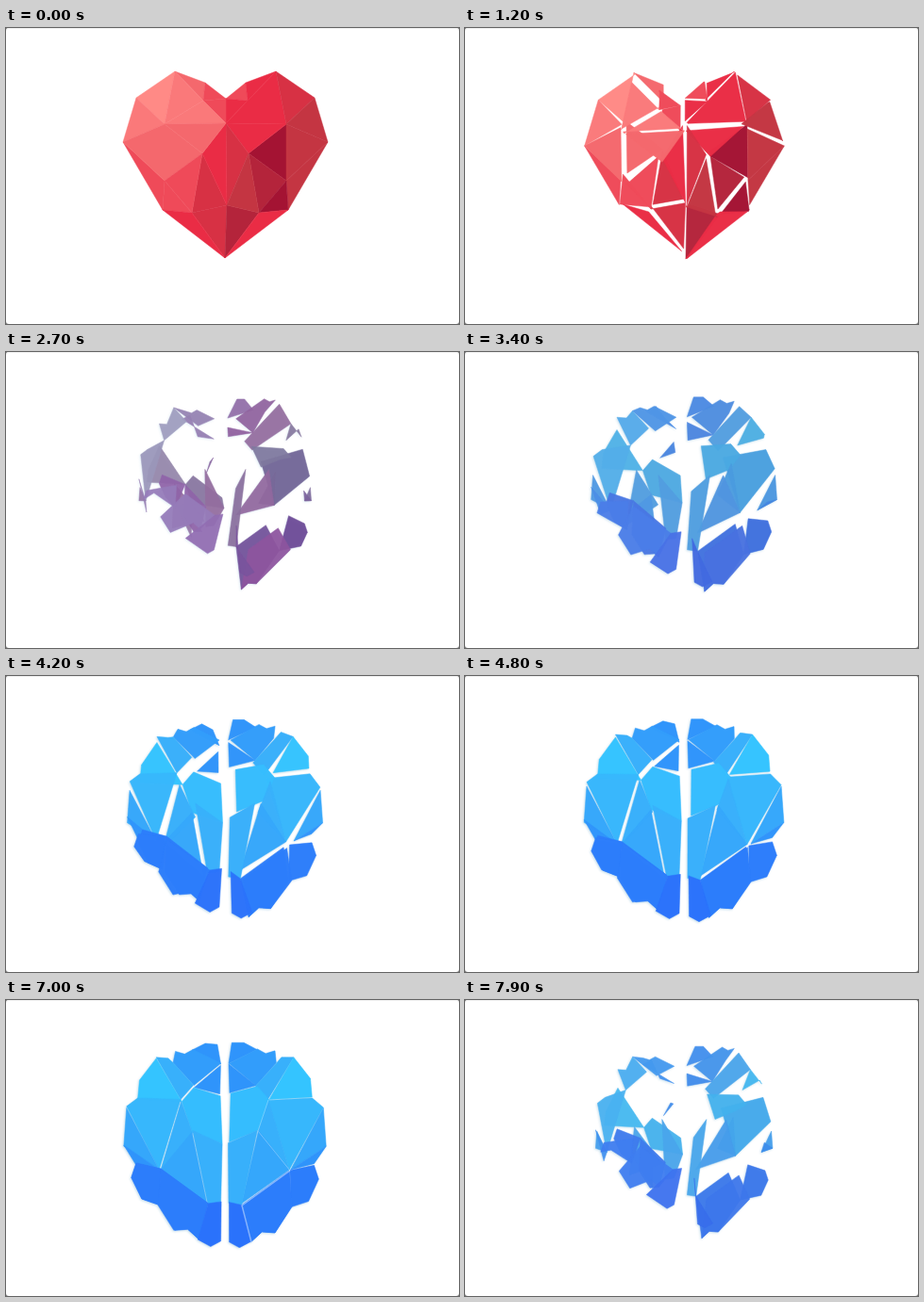
Recreate the animation shown at these times as an HTML page. Size 480x314 px, loop 8000 ms.

```html
<!DOCTYPE html>
<html lang="en">
<head>
<meta charset="utf-8">
<title>Heart and brain</title>
<style>
  html, body { margin: 0; width: 100%; height: 100%; overflow: hidden; background: #777; }
  svg { display: block; width: 480px; height: 314px; background: #fff; border-radius: 3px; box-shadow: inset 0 1px #eee; }
  polygon { stroke-width: .5; stroke-linejoin: round; }
  polyline { fill: none; stroke: #e8f6ff; stroke-linejoin: round; }
</style>
</head>
<body>
<svg viewBox="0 0 480 314">
  <g id="pieces"></g>
  <g id="cracks"></g>
</svg>
<script>
const LOOP = 8000, MORPH = 5500, OUT = 850, BACK = 6870;
const HEART_AXIS = 232.5, BRAIN_AXIS = 232;

const clamp = v => Math.min(1, Math.max(0, v));
const mix = (a, b, k) => a.map((v, i) => v + (b[i] - v) * k);
const smooth = v => { v = clamp(v); return v * v * (3 - 2 * v); };
const mirror = ([x, y], axis) => [2 * axis - x, y];

// Right half of each shape, one letter per corner; the left half is its mirror image.
const mesh = (names, text) => {
  const xy = text.split(' ').map(s => s.split(',').map(Number));
  return Object.fromEntries([...names].map((n, i) => [n, xy[i]]));
};
const heart = mesh('CDEFGHINOQRSUX',
  '233,75 254,58 286,46 327,74 341,121 299,193 232,244 233,101 297,102 257,133 297,162 234,188 268,196 256,77');
const brain = mesh('ABCDEFGHIJKLMNOPQRSTUVWXYZ3456',
  '239,45 252,45 266,52 236,67 285,54 287,67 265,91 237,99 292,61 305,60 323,83 278,106 325,104 ' +
  '337,113 340,155 301,181 267,139 235,152 250,218 236,216 327,175 332,190 321,214 303,220 286,247 272,246 ' +
  '260,257 247,264 236,258 275,57');

// Each brain facet and its shade, then the heart corners that fly to it, with a shade.
// Lower-case heart corners lie on the left half.
const facets = `
ABCD 3 DDXC3 rooq2
DC6EFG 4 XEEEDX4 xxxxed2
DGH 3 NXC4 uSq5
GFIJL 6 NXEON4 eeoof0
JKML 9 OOEF5 rhhu3
LMNP 7 QORQ8 foog1
NOP 5 HRG6 hrg3
HGLQR 8 OGGFF6 IuuuS5
LPQ 6 RQU7 huI4
QPS 5 OQN4 uqr3
RQST 6 QNSS5 SNqq4
POU 3 GRO6 gor2
PUVWX 1 RHHHU8 Cdddx3 xooex1
PXYZ3S 1 SUIIIS7 UHIIIU4 CNNNxx3 NooxxN1
TS345 0 QSUUU6 NNoqq2`;

const rgb = c => [1, 3, 5].map(i => parseInt(c.substr(i, 2), 16));
const ramp = colors => {
  const stops = colors.split(' ').map(rgb);
  return v => {
    const at = v * (stops.length - 1), i = Math.min(stops.length - 2, Math.floor(at));
    return mix(stops[i], stops[i + 1], at - i);
  };
};
const red = ramp('#ff8a86 #f4686d #ea2c45 #c43542 #a41333');
const blue = ramp('#2a72fb #2f94fb #38b0fb #34c4ff');

const add = (parent, tag) => {
  const el = document.createElementNS('http://www.w3.org/2000/svg', tag);
  parent.append(el);
  return el;
};
const group = document.getElementById('pieces');
const cracks = document.getElementById('cracks');

const heartPoint = n => heart[n] || mirror(heart[n.toUpperCase()], HEART_AXIS);
const pieces = facets.trim().split('\n').flatMap(row => {
  const [outline, shade, ...sources] = row.split(' ');
  return sources.map(source => {
    const left = /[a-z]/.test(source);
    return {
      el: add(group, 'polygon'),
      from: [...source.slice(0, -1)].map(heartPoint),
      to: [...outline].map(n => left ? mirror(brain[n], BRAIN_AXIS) : brain[n]),
      warm: red(source.slice(-1) / 8),
      cold: blue(shade / 9)
    };
  });
});

for (const [path, width] of [['LQP', .7], ['PS3', 1.5]]) {
  const line = add(cracks, 'polyline');
  line.setAttribute('points', [...path].map(n => brain[n]).join(' '));
  line.setAttribute('stroke-width', width);
}

// Solves cubic-bezier(.2, .12, .25, 1) for the progress at time x.
function ease(x) {
  if (x <= 0 || x >= 1) return clamp(x);
  const bez = (a, b, s) => 3 * a * s * (1 - s) ** 2 + 3 * b * s * s * (1 - s) + s ** 3;
  let lo = 0, hi = 1;
  for (let i = 0; i < 24; i++) {
    const mid = (lo + hi) / 2;
    if (bez(.2, .25, mid) < x) lo = mid; else hi = mid;
  }
  return bez(.12, 1, lo);
}

function draw(t) {
  const back = t >= BACK;
  const x = clamp((t - (back ? BACK : OUT)) / MORPH);
  const flip = v => back ? 1 - v : v;
  const pose = flip(ease(x));
  const tint = flip(smooth((x - .1) / .48));
  for (const { el, from, to, warm, cold } of pieces) {
    const color = `rgb(${mix(warm, cold, tint).map(Math.round)})`;
    el.setAttribute('points', from.map((v, i) => mix(v, to[i], pose).map(n => n.toFixed(2))).join(' '));
    el.setAttribute('fill', color);
    el.setAttribute('stroke', color);
    el.setAttribute('opacity', 1 - .08 * Math.sin(Math.PI * pose));
  }
  group.style.filter = `drop-shadow(-1px 1px 1px rgba(0,110,170,${(.22 * tint).toFixed(3)}))`;
  cracks.setAttribute('opacity', smooth((pose - .96) / .04) * .85);
}

const start = performance.now();
function tick() {
  draw((performance.now() - start) % LOOP);
  requestAnimationFrame(tick);
}
tick();
</script>
</body>
</html>
```
